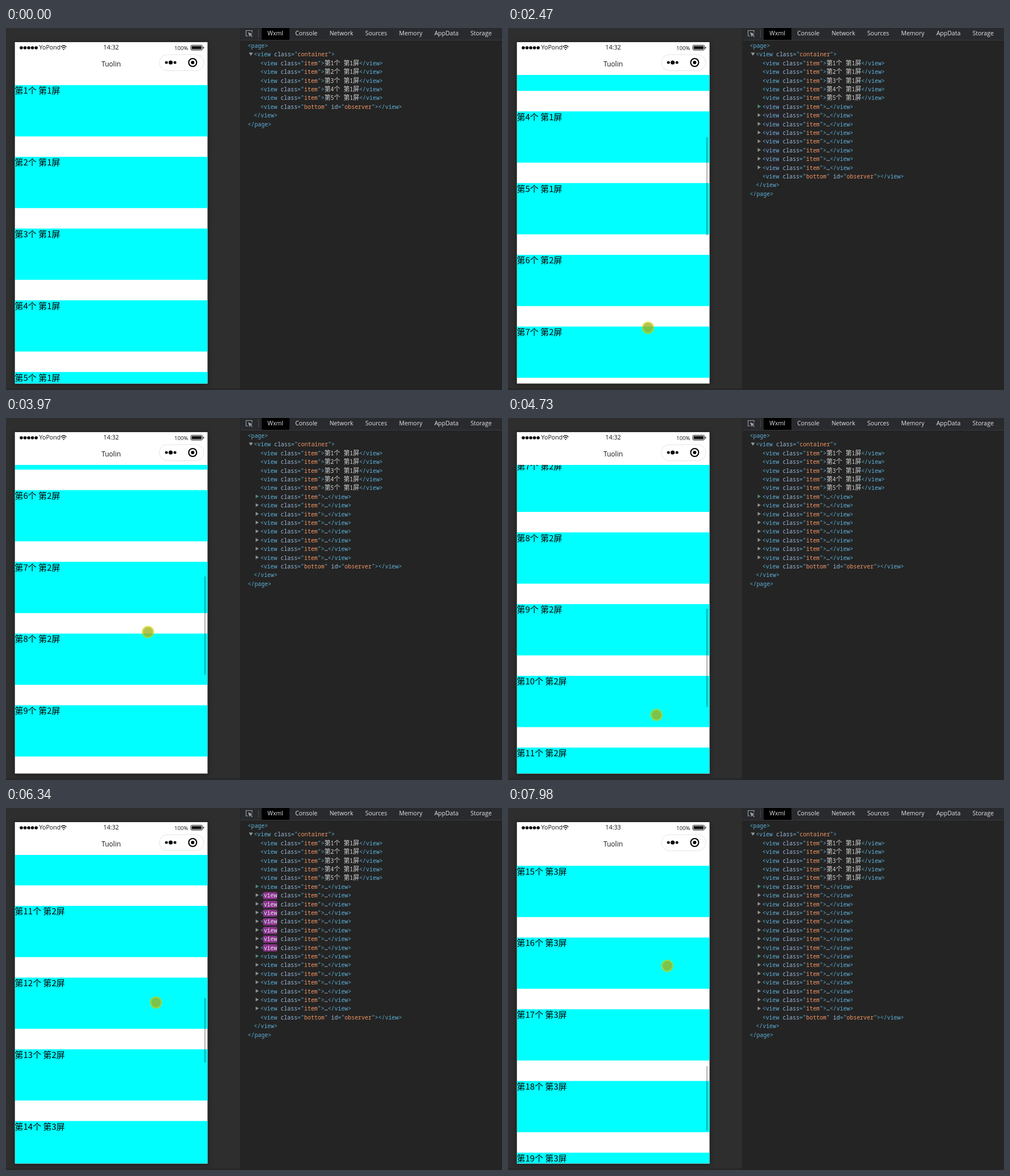
Animation of 875 by 640 pixels, one loop 8000 ms. Source, as an HTML page:

```html
<!DOCTYPE html>
<html lang="zh">
<head>
<meta charset="utf-8">
<style>
  html, body { margin: 0; width: 100%; height: 100%; overflow: hidden; background: #242424; }
  svg { display: block; width: 875px; height: 640px; font-family: "Open Sans", "Noto Sans", sans-serif; }
  #items { font: 15px "Noto Sans CJK SC", "Noto Sans CJK", sans-serif; }
  #tree { font: 9.92px "Noto Sans Mono", "DejaVu Sans Mono", monospace; fill: #5db0d7; white-space: pre; }
  .name { fill: #9bbbdc; }
  .value { fill: #f29766; }
  .plain { fill: #d5d5d5; }
  .cjk { font: 10.9px "Noto Sans CJK SC", "Noto Sans CJK", sans-serif; }
  .mid { text-anchor: middle; }
</style>
</head>
<body>
<svg viewBox="0 0 875 640">
  <defs>
    <clipPath id="page"><rect x="16" y="83" width="339.5" height="545.6"/></clipPath>
    <filter id="blur"><feGaussianBlur stdDeviation="4"/></filter>
  </defs>

  <rect width="413" height="640" fill="#2e2e2e"/>
  <rect x="14" y="25" width="343" height="606" opacity=".3" filter="url(#blur)"/>
  <rect y="637" width="413" height="3" fill="#272727"/>
  <rect x="15.700" y="25" width="339.8" height="603.6" fill="#fff"/>

  <g clip-path="url(#page)">
    <g id="items"></g>
    <rect id="bar" x="350" width="2" fill="#000" fill-opacity=".3"/>
  </g>

  <g id="dots"></g>
  <g font-size="10.7" fill="#111">
    <text x="58.5" y="38.3">YoPond</text>
    <text id="clock" class="mid" x="185.5" y="38.3"></text>
    <text x="297" y="39" font-size="9.6">100%</text>
    <text class="mid" x="185.5" y="67.5" font-size="12">Tuolin</text>
  </g>
  <g fill="none" stroke="#111" stroke-width="1.5">
    <path d="M97 33.5Q101.7 28.7 106.5 33.5M98.9 35.7Q101.7 32.7 104.6 35.7"/>
    <path d="M100 37.2h3.4l-1.7 2z" fill="#111" stroke="none"/>
    <rect x="326" y="30.5" width="20.5" height="8.5" rx="2" stroke-width="1"/>
    <rect x="327.5" y="32" width="17.5" height="5.5" rx="1" fill="#111" stroke="none"/>
    <path d="M348.5 33.3v3"/>
  </g>
  <rect x="270.5" y="47" width="78.5" height="28.5" rx="14.2" fill="#fff" stroke="#e4e4e4"/>
  <circle cx="283" cy="61" r="2.5"/>
  <circle cx="290.5" cy="61" r="3.6"/>
  <circle cx="298" cy="61" r="2.5"/>
  <circle cx="329.3" cy="61" r="7" fill="none" stroke="#000" stroke-width="2.1"/>
  <circle cx="329.3" cy="61" r="3"/>

  <rect x="414" width="461" height="21" fill="#292a2d"/>
  <rect x="414" y="21" width="461" height="1" fill="#3a3b3e"/>
  <rect x="451" width="49" height="21" fill="#000"/>
  <path d="M445.5 3v14" stroke="#494c50"/>
  <path d="M427 14h-3.5V4.500H434V8" fill="none" stroke="#9aa0a6" stroke-width="1.1"/>
  <path d="M427 7.500l8 3.200-3 1.200 3 3-1 1-3-3-1.300 2.800z" fill="#9aa0a6"/>
  <text id="tabs" x="461.3" y="13.3" font-size="10.5" fill="#e3e5e8"></text>
  <g id="tree"></g>

  <g id="cursor">
    <circle id="ring" r="10.8"/>
    <circle id="core" r="8.4"/>
  </g>
</svg>

<script>
const $ = id => document.getElementById(id);
const LOOP = 8000, TICK = 124.7;          // the screen refreshes once per tick
const PITCH = 126.8, VIEW = 545.5, ROW = 15.4;
const LOADS = [12, 51];                   // ticks at which more items arrive

// Pointer strokes in ticks: the page follows after `slack` px and coasts `glide` px on release
const strokes = [
  { start: 4, end: 6, from: [626, 492], to: [258, 344], slack: Infinity },
  { start: 10, end: 14.5, from: [244, 504], to: [248, 150] },
  { start: 20, end: 24, from: [247, 530], to: [245, 320], glide: 15 },
  { start: 30, end: 34, from: [245, 467], to: [256, 290], glide: 47 },
  { start: 37, end: 42, from: [262, 589], to: [262, 268], glide: 16 },
  { start: 48, end: 54, from: [263, 576], to: [266, 112], slack: 96, glide: 89 },
  { start: 59, end: 64, from: [273, 561], to: [281, 279], slack: 25 }
];

const clamp = v => Math.min(1, Math.max(0, v));
const mix = (a, b, f) => a.map((v, i) => v + (b[i] - v) * f);
const progress = (s, n) => clamp((n - s.start) / (s.end - s.start));

function pointer(n) {
  const i = strokes.findLastIndex(s => s.start <= n);
  if (i < 0) return null;
  const s = strokes[i], next = strokes[i + 1];
  const back = next ? clamp((n - s.end) / (next.start - s.end)) : 0;
  const spot = back
    ? mix(s.to, next.from, Math.sin(back * Math.PI / 2))
    : mix(s.from, s.to, progress(s, n));
  const drags = s.slack !== Infinity;
  return { spot, down: drags && n <= s.end, bar: drags ? clamp((s.end + 5 - n) / 2) : 0 };
}

const scrollAt = n => strokes.reduce((sum, { slack = 20, glide = 0, ...s }) => {
  const drag = (s.from[1] - s.to[1]) * progress(s, n);
  return sum + Math.max(0, drag - slack) + glide * (1 - Math.exp(Math.min(0, s.end - n)));
}, 0);

function buildStatic() {
  for (let i = 0; i < 5; i++)
    $("dots").innerHTML += `<circle cx="${27 + 6.55 * i}" cy="35" r="2.8"/>`;
  $("tabs").innerHTML = "Wxml Console Network Sources Memory AppData Storage".split(" ")
    .map((name, i) => `<tspan dx="${i ? 21.2 : 0}">${name}</tspan>`).join("");
  for (let i = 1; i <= 20; i++) {
    const y = 101 + PITCH * (i - 1), screen = i <= 5 ? 1 : i <= 13 ? 2 : 3;
    $("items").innerHTML += `<g><rect x="15.7" y="${y}" width="340" height="90.6" fill="#0ff"/>` +
      `<text x="15.5" y="${y + 15.3}">第${i}个 第${screen}屏</text></g>`;
  }
}

const span = (cls, s) => `<tspan class="${cls}">${s}</tspan>`;
const attr = (name, value) => ` ${span("name", name)}="${span("value", value)}"`;
const cjk = s => span("cjk", s);

function buildTree(count) {
  let row = 0, html = "";
  const line = (x, s, before = "") => {
    const y = 31.5 + ROW * row++;
    html += `<g transform="translate(0 ${y})">${before}<text x="${x}" y="3.5">${s}</text></g>`;
  };
  const open = (attrs, cls = "") => `&lt;${span(cls, "view")}${attrs}&gt;`;
  const close = "&lt;/view&gt;", item = attr("class", "item");
  line(426.5, "&lt;page&gt;");
  line(437.3, open(attr("class", "container")), '<path d="M428.500 -3.500h7l-3.500 5.500z" fill="#9a9a9a"/>');
  for (let i = 1; i <= count; i++) {
    if (i <= 5) {
      line(448.7, open(item) + span("plain", `${cjk("第")}${i}${cjk("个")} ${cjk("第")}1${cjk("屏")}`) + close);
    } else {
      const fill = i === 6 || i === 14 ? "#4c8f78" : "#929292";
      line(448.7, open(item, "tag") + span("plain", "…") + close,
        `<path d="M440.500 -4v6.600l5.500-3.300z" fill="${fill}"/>` +
        '<rect class="flash" x="453.7" y="-6" width="24.500" height="12.500" rx="1.500" fill="#8a338c"/>');
    }
  }
  line(448.7, open(attr("class", "bottom") + attr("id", "observer")) + close);
  line(437.3, close);
  line(426.5, "&lt;/page&gt;");
  $("tree").innerHTML = html;
}

let shown = 0;

function draw(t) {
  const n = Math.floor(t / TICK + .254);
  const loads = LOADS.filter(tick => n >= tick).length, count = [5, 13, 20][loads];
  if (count !== shown) {
    buildTree(shown = count);
    [...$("items").children].forEach((g, i) => g.style.display = i < count ? "" : "none");
  }

  const scroll = scrollAt(n), scale = 536 / (count * PITCH + 35), hand = pointer(n);
  $("items").setAttribute("transform", `translate(0 ${-scroll})`);
  $("bar").setAttribute("y", 86.7 + scroll * scale);
  $("bar").setAttribute("height", VIEW * scale);
  $("bar").setAttribute("opacity", hand ? hand.bar : 0);
  $("clock").textContent = n < 54 ? "14:32" : "14:33";

  // Updated nodes glow purple and fade out
  const glow = loads ? Math.exp(-.34 * (n - LOADS[loads - 1])) : 0;
  const tags = document.querySelectorAll(".tag");
  document.querySelectorAll(".flash").forEach((r, i) => {
    const a = i >= loads - 1 && i < 8 && glow > .03 ? glow : 0;
    r.setAttribute("opacity", a);
    tags[i].style.fill = `color-mix(in srgb, #f0e4f4 ${a * 100}%, #5db0d7)`;
  });

  $("cursor").style.display = hand ? "" : "none";
  if (!hand) return;
  $("cursor").setAttribute("transform", `translate(${hand.spot})`);
  $("ring").setAttribute("fill", hand.down ? "rgba(205,205,0,.7)" : "rgba(128,128,128,.5)");
  $("core").setAttribute("fill", hand.down ? "rgba(60,120,80,.25)" : "rgba(90,90,90,.5)");
}

buildStatic();
let start;
function frame(now) {
  start ??= now;
  draw((now - start) % LOOP);
  requestAnimationFrame(frame);
}
draw(0);
requestAnimationFrame(frame);
</script>
</body>
</html>
```
